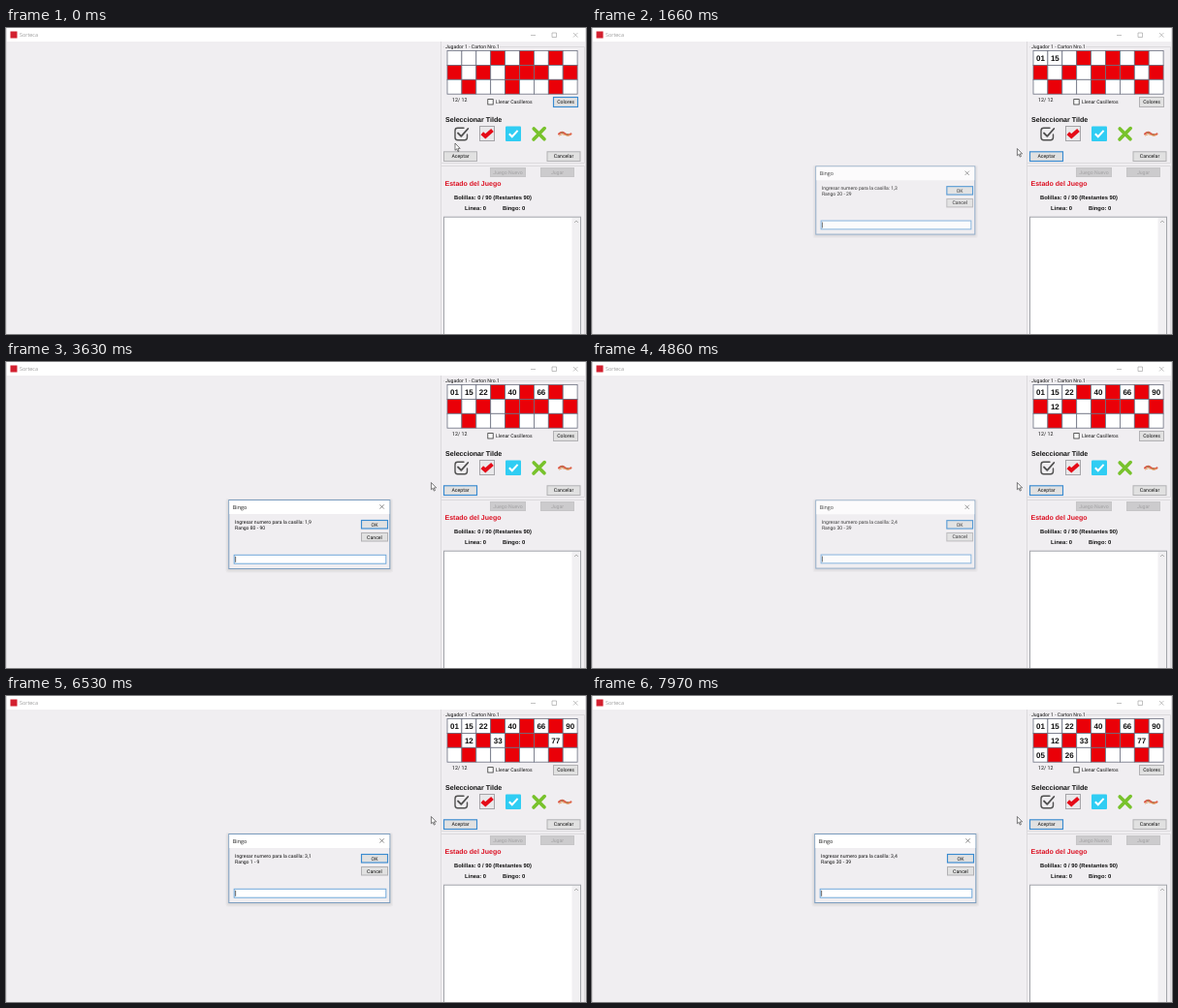
An HTML page for the animation above (8 s loop, 598 by 316 pixels).

```html
<!DOCTYPE html>
<html lang="es">
<head>
<meta charset="utf-8">
<title>Sorteca</title>
<style>
html, body { margin: 0; width: 598px; height: 316px; overflow: hidden; background: #f0eef1; }
svg { display: block; }
text { font: 5.1px Roboto, "Liberation Sans", sans-serif; fill: #111; text-rendering: geometricPrecision; white-space: pre; }
text.b { font-family: "Liberation Sans", sans-serif; font-weight: bold; }
text.ui { font-family: "Open Sans", "Noto Sans", sans-serif; }
</style>
</head>
<body>
<svg id="stage" width="598" height="316" viewBox="0 0 598 316"></svg>
<script>
const LOOP = 8000;
const RED = '#ea0008', BLUE = '#3a8bd0', GRAY = '#b2b1b4', LINE = '#dcdadd';
const stage = document.getElementById('stage');

function add(parent, tag, attrs, content) {
  const el = document.createElementNS('http://www.w3.org/2000/svg', tag);
  for (const k in attrs) el.setAttribute(k, attrs[k]);
  if (content !== undefined) el.textContent = content;
  parent.append(el);
  return el;
}
const box = (p, x, y, width, height, fill, stroke = 'none', more) =>
  add(p, 'rect', { x, y, width, height, fill, stroke, ...more });
const path = (p, d, stroke, width = 1, more) =>
  add(p, 'path', { d, stroke, 'stroke-width': width, fill: 'none', ...more });
function label(p, x, y, str, size = 5.1, cls = '', fill = '#111', anchor = 'start') {
  const el = add(p, 'text', { x, y, class: cls, 'text-anchor': anchor }, str);
  el.style.fontSize = size + 'px';
  el.style.fill = fill;
  return el;
}
function button(p, x, y, w, h, str, off) {
  const face = box(p, x + .5, y + .5, w - 1, h - 1, off ? '#cccbcd' : '#e1e1e1', off ? '#c6c5c7' : GRAY);
  label(p, x + w / 2, y + h / 2 + 1.8, str, 5.2, '', off ? '#a3a2a4' : '#111', 'middle');
  return on => {
    face.setAttribute('stroke', on ? BLUE : GRAY);
    face.setAttribute('stroke-width', on ? 1.15 : 1);
  };
}
const show = (el, on) => el.setAttribute('visibility', on ? 'visible' : 'hidden');

// Main window
box(stage, 0, 0, 598, 316, '#f0eef1');
box(stage, 0, 0, 598, 14, '#fff');
path(stage, 'M.5 0V316', '#d5d3d6', .8);
path(stage, 'M597.5 0V316', '#e2e0e3');
box(stage, 4.5, 3.5, 7, 7, '#d3202f');
const title = label(stage, 14, 9, 'Sorteca', 5.4, 'ui');
const controls = path(stage, 'M541 7.5H546M563 5H567.5V9.5H563ZM585 5L589.5 9.5M589.5 5L585 9.5', '#999', .6);

path(stage, 'M448.5 14V316', LINE);
path(stage, 'M451 19.5H596.5V139.5H449M449 142.5H596.5V316', LINE);
box(stage, 452, 16, 57, 6, '#f0eef1');
label(stage, 453, 20.8, 'Jugador 1 - Carton Nro.1');

// Card: "1" marks a blocked cell
const CELL = 14.9, LEFT = 455, TOP = 23.5;
const cells = ['000101010', '101011101', '010010010'].map((row, r) => [...row].map((v, c) => {
  const x = LEFT + c * CELL, y = TOP + r * CELL;
  box(stage, x, y, CELL, CELL, v === '1' ? RED : '#fff', '#6c7080', { 'stroke-width': .8 });
  return label(stage, x + CELL / 2, y + 10.3, '', 8, 'b', '#111', 'middle');
}));

label(stage, 460, 76, '12/ 12', 5.3);
box(stage, 496.8, 73.6, 5.4, 5.4, '#fff', '#333', { 'stroke-width': .8 });
label(stage, 505, 78.1, 'Llenar Casilleros');
const focusColors = button(stage, 564, 71, 26, 11, 'Colores');
label(stage, 453, 96.6, 'Seleccionar Tilde', 7.1, 'b');

// Tick styles
const round = { 'stroke-linecap': 'round', 'stroke-linejoin': 'round' };
path(stage, 'M475.5 110V113Q475.5 115.7 472.8 115.7H465.7Q463 115.7 463 113V106Q463 103.3 465.7 103.3H472', '#505050', 1.4, round);
path(stage, 'M466 108.5L469.3 111.8L476.3 104', '#505050', 1.8, round);
box(stage, 488.5, 101.5, 15, 15, '#e9e8ea', '#a5a4a8');
path(stage, 'M490.8 108.8L494.3 111.8L501.5 105.5', '#e50b18', 4);
box(stage, 515, 101.5, 16, 15.5, '#30cdf3', 'none', { rx: 1 });
path(stage, 'M518.8 109.2L521.8 112.2L527.6 105.8', '#fff', 2);
path(stage, 'M544.2 104L555 114.8M555.2 103.6L544 115', '#78c22c', 3.6, round);
path(stage, 'M570 109.5Q573 106.5 576 109T582.5 109.3', '#dc5a48', 2, round);
path(stage, 'M570.5 111Q574 108.5 576.5 110.5T582 110.3', '#e6a25c', .9, round);
path(stage, 'M572.5 108.3L574 108M578 110L579.5 109.8', '#7da05a', .8, round);

const focusAccept = button(stage, 451, 127.3, 35, 10.7, 'Aceptar');
button(stage, 557.5, 127.3, 35, 10.7, 'Cancelar');
button(stage, 499, 144, 37, 10, 'Juego Nuevo', true);
button(stage, 551, 144, 35, 10, 'Jugar', true);

// Game state
label(stage, 452.5, 163.2, 'Estado del Juego', 7, 'b', '#dc1022');
label(stage, 462, 176.7, 'Bolillas: 0 / 90 (Restantes 90)', 5.8, 'b');
label(stage, 473, 187.7, 'Linea: 0', 5.8, 'b');
label(stage, 512, 187.7, 'Bingo: 0', 5.8, 'b');
box(stage, 451.5, 195.2, 141, 125, '#fff', '#a2a4aa');
box(stage, 583.5, 196, 8.5, 120, '#f1f0f2');
path(stage, 'M586 201L588 199L590 201', '#aaa', .9);

// Input dialog
const dialog = add(stage, 'g', {});
for (let i = 3; i > 0; i--)
  box(dialog, 229.5 - i, 143 - i + 1, 166.5 + 2 * i, 70.5 + 2 * i, '#000', 'none', { opacity: .03, rx: 2 });
box(dialog, 229.8, 142.5, 166, 71, '#f0eef1', '#7c9dbf');
box(dialog, 230.3, 143, 165, 14, '#fff');
label(dialog, 233.8, 151.7, 'Bingo', 5.4, 'ui');
path(dialog, 'M385.5 147.3L389.8 151.6M389.8 147.3L385.5 151.6', '#444', .6);
const ask = label(dialog, 236, 166.6, '');
const range = label(dialog, 236, 172.6, '');
button(dialog, 366, 163, 28, 9.5, 'OK')(true);
button(dialog, 366, 176, 28, 9.5, 'Cancel');
box(dialog, 235.2, 199.3, 156.6, 8.9, '#fff', '#70a8da');
const typed = label(dialog, 236.4, 206, '', 5.5);
const caret = box(dialog, 236.4, 200.8, .7, 6, '#222');

const pointer = add(stage, 'path', {
  d: 'M0 0V7.3L1.7 5.8L2.9 8.6L4 8.1L2.9 5.4H5.2Z', fill: '#fff', stroke: '#444', 'stroke-width': .7
});

// row, column, number, then times: open, first digit, second digit, close
const prompts = [
  [1, 1, '01', 350, 750, 810, 870], [1, 2, '15', 1110, 1500, 1550, 1575],
  [1, 3, '22', 1608, 1930, 1980, 2035], [1, 5, '40', 2120, 2510, 2620, 2670],
  [1, 7, '66', 2725, 3260, 3310, 3370], [1, 9, '90', 3475, 4060, 4115, 4170],
  [2, 2, '12', 4225, 4480, 4530, 4750], [2, 4, '33', 4808, 5240, 5295, 5400],
  [2, 8, '77', 5455, 6040, 6210, 6370], [3, 1, '05', 6424, 6790, 7010, 7070],
  [3, 3, '26', 7150, 7700, 7755, 7808], [3, 4, '', 7862, 9000, 9000, 9000]
].map(([row, col, num, open, first, second, close]) => ({ row, col, num, open, first, second, close }));

const track = [[0, 463, 119], [50, 463, 119], [180, 467, 130], [250, 467, 130], [450, 438.4, 124.5], [LOOP, 438.4, 124.5]];
function pointerAt(t) {
  const i = track.findIndex(k => k[0] > t);
  const [t0, x0, y0] = track[i - 1], [t1, x1, y1] = track[i];
  const u = (t - t0) / (t1 - t0), e = u * u * (3 - 2 * u);
  return [x0 + (x1 - x0) * e, y0 + (y1 - y0) * e];
}

function drawDialog(p, t) {
  const age = t - p.open, closing = t >= p.close;
  const [scale, opacity] = closing ? [.97, .4] : age < 50 ? [.96, .5] : age < 104 ? [.988, .82] : [1, 1];
  dialog.setAttribute('transform', `translate(312.8 178) scale(${scale}) translate(-312.8 -178)`);
  dialog.setAttribute('opacity', opacity);
  const low = p.col === 1 ? 1 : (p.col - 1) * 10;
  const high = p.col === 9 ? 90 : p.col * 10 - 1;
  ask.textContent = `Ingresar numero para la casilla: ${p.row},${p.col}`;
  range.textContent = `Rango ${low} - ${high}`;
  const count = (t >= p.first) + (t >= p.second);
  typed.textContent = p.num.slice(0, count);
  caret.setAttribute('x', 236.4 + count * 3.06);
  caret.setAttribute('opacity', count || age < 230 || age >= 760 ? 1 : 0);
  return count;
}

function draw(t) {
  for (const p of prompts) cells[p.row - 1][p.col - 1].textContent = t >= p.close ? p.num : '';
  const p = prompts.find(q => t >= q.open && t < q.close + 28);
  const count = p ? drawDialog(p, t) : 0;
  show(dialog, p);
  show(pointer, !count);
  const active = !p && t >= 50;
  title.style.fill = active ? '#111' : '#999';
  controls.setAttribute('stroke', active ? '#222' : '#999');
  focusColors(t < 200);
  focusAccept(t >= 200);
  pointer.setAttribute('transform', `translate(${pointerAt(t)})`);
}

const start = performance.now();
function tick() {
  draw((performance.now() - start) % LOOP);
  requestAnimationFrame(tick);
}
tick();
</script>
</body>
</html>
```
